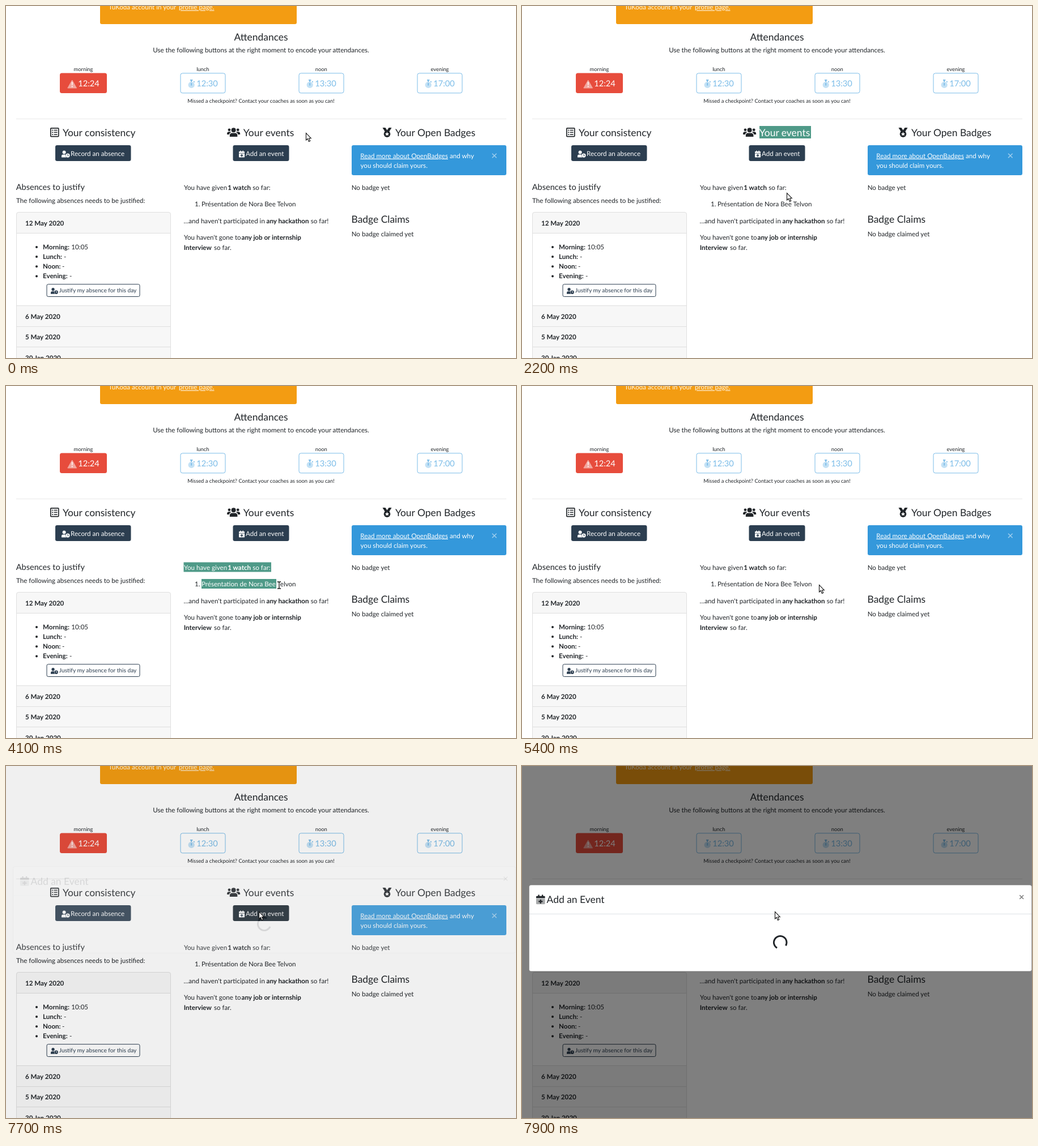
Write an HTML page that moves like this. It is 900x622 px and loops after 8 s.

```html
<!DOCTYPE html>
<html lang="en">
<head>
<meta charset="utf-8">
<title>Attendance dashboard</title>
<style>
  html, body { margin: 0; width: 100%; height: 100%; overflow: hidden; background: #fff; }
  svg { display: block; }
  text { font: 11.6px Lato, sans-serif; text-rendering: geometricPrecision; }
  .h { font-size: 17.45px; }
  .h5 { font-size: 14.55px; }
  .time { font-size: 14.7px; }
  .sm { font-size: 9.35px; }
  .btn { font-size: 10.2px; }
  .mid { text-anchor: middle; }
  .b { font-weight: 700; }
  .u { text-decoration: underline; }
</style>
</head>
<body>
<svg width="900" height="622" viewBox="0 0 900 622" fill="#212529">
  <defs>
    <g id="person">
      <circle cx="4.6" cy="3" r="3"/>
      <path d="M0 12V9.6Q0 7 2.6 7H7Q6.4 10 8.4 12Z"/>
      <circle cx="11" cy="8.6" r="3.6"/>
      <path d="M11 6.4V8.8H12.6" fill="none" stroke="var(--bg)"/>
    </g>
    <g id="calendar">
      <path d="M0 5H11V11Q11 12 10 12H1Q0 12 0 11Z" fill="var(--body)"/>
      <path d="M0 4.3V2.6Q0 1.6 1 1.6H2.4V0H4V1.6H7V0H8.6V1.6H10Q11 1.6 11 2.6V4.3Z"/>
      <path d="M5.5 6V11M3 8.5H8" stroke="var(--plus)" stroke-width="1.5"/>
    </g>
    <g id="watch">
      <circle cx="6.2" cy="9.4" r="5.6" opacity=".45"/>
      <path d="M4 0H8.4V1.8H7.2V4H5.2V1.8H4ZM9.6 3.8L10.8 2.6L12.2 4L11 5.2ZM5.3 6H7.1V10.4H5.3Z"/>
    </g>
    <clipPath id="selection">
      <rect id="selHead" y="212" height="22"/>
      <rect id="selTop" x="313.5" y="311.5" height="17"/>
      <rect id="selItem" x="345" y="341" height="17"/>
    </clipPath>
  </defs>

  <!-- notice and attendance -->
  <rect x="166" y="-10" width="347" height="42" rx="3" fill="#f39c12"/>
  <g fill="#fff" opacity=".92">
    <text x="181" y="6.4">TuKoda account in your</text>
    <text x="305" y="6.4" class="u">profile page.</text>
  </g>
  <text x="450" y="61.3" class="h mid">Attendances</text>
  <text x="450" y="81.5" class="mid">Use the following buttons at the right moment to encode your attendances.</text>
  <g class="mid">
    <text x="136.5" y="114.6" class="sm">morning</text>
    <text x="347.3" y="114.6" class="sm">lunch</text>
    <text x="556.3" y="114.6" class="sm">noon</text>
    <text x="765.5" y="114.6" class="sm">evening</text>
    <text x="450" y="170.6" class="sm">Missed a checkpoint? Contact your coaches as soon as you can!</text>
  </g>
  <rect x="95" y="118.5" width="83" height="35.5" rx="3.5" fill="#e74c3c"/>
  <g fill="#fff">
    <path d="M116.7 131L124.6 145H108.8Z" opacity=".5" stroke="#fff" stroke-linejoin="round"/>
    <path d="M115.8 134.5H117.7L117.3 140H116.2ZM115.8 141.4H117.7V143.2H115.8Z"/>
    <text x="146" y="141.8" class="time mid">12:24</text>
  </g>
  <g id="slots" fill="#7bbce8"></g>
  <path d="M18 199.5H883" stroke="#e9e9e9"/>

  <!-- consistency -->
  <g stroke="#212529" fill="none">
    <rect x="78.8" y="215.8" width="14" height="14.8" rx="1" stroke-width="1.7"/>
    <path d="M81 219.5H83.2M81 223.2H83.2M81 227H83.2M84.6 219.5H90.6M84.6 223.2H90.6M84.6 227H90.6" stroke-width="1.5"/>
  </g>
  <text x="100" y="229.5" class="h">Your consistency</text>
  <rect x="87" y="246" width="133.5" height="28" rx="3.2" fill="#2c3e50"/>
  <use href="#person" x="98" y="255.5" fill="#fff" style="--bg:#2c3e50"/>
  <text x="114" y="264.6" fill="#fff">Record an absence</text>
  <text x="17.7" y="325.4" class="h5">Absences to justify</text>
  <text x="18" y="348">The following absences needs to be justified:</text>
  <path d="M18.5 401.5V368Q18.5 364.5 22 364.5H287Q290.5 364.5 290.5 368V401.5ZM18.5 529.5H290.5V630H18.5Z" fill="#f7f7f7"/>
  <path d="M18.5 630V368Q18.5 364.5 22 364.5H287Q290.5 364.5 290.5 368V630M18 401.5H291M18 529.5H291M18 566.5H291M18 602.5H291" fill="none" stroke="#dfdfdf"/>
  <g class="b">
    <text x="34" y="387.6" class="b">12 May 2020</text>
    <text x="34" y="552.8" class="b">6 May 2020</text>
    <text x="34" y="589.4" class="b">5 May 2020</text>
    <text x="34" y="626" class="b">30 Jan 2020</text>
  </g>
  <g id="times"></g>
  <rect x="72" y="491.7" width="164" height="21.8" rx="2.5" fill="none" stroke="#2c3e50"/>
  <use href="#person" transform="translate(79 498) scale(.88 .9)" fill="#2c3e50" style="--bg:#fff"/>
  <text x="93.8" y="506.3" class="btn" fill="#2c3e50">Justify my absence for this day</text>

  <!-- events -->
  <path d="M394.8 231Q394.2 224.8 398.4 224.4H404.8Q409 224.8 408.4 231ZM390 227Q389.8 222.4 393 222.3H396Q397 222.4 397.2 223Q394.4 224 393.8 227ZM413.2 227Q413.4 222.4 410.2 222.3H407.2Q406.2 222.4 406 223Q408.8 224 409.4 227Z"/>
  <circle cx="401.6" cy="219.3" r="4"/>
  <circle cx="394" cy="218.8" r="2.4"/>
  <circle cx="409.2" cy="218.8" r="2.4"/>
  <rect id="addBtn" x="400.5" y="246" width="99" height="28" rx="3.2"/>
  <use href="#calendar" transform="translate(411 255.5) scale(.92 1)" fill="#fff" style="--body:#fff;--plus:#2c3e50"/>
  <text x="423" y="264.6" fill="#fff">Add an event</text>
  <g id="events">
    <text x="418.8" y="229.5" class="h">Your events</text>
    <text x="314" y="324.7">You have given</text>
    <text x="391.3" y="324.7" class="b">1 watch</text>
    <text x="435.3" y="324.7">so far:</text>
    <text x="345" y="354.3">Présentation de Nora Bee Telvon</text>
  </g>
  <text x="333" y="354.3">1.</text>
  <text x="313.5" y="384">…and haven't participated in</text>
  <text x="459.5" y="384" class="b">any hackathon</text>
  <text x="537.8" y="384">so far!</text>
  <text x="314" y="413.4">You haven't gone to</text>
  <text x="415.5" y="413.4" class="b">any job or internship</text>
  <text x="313.7" y="430.6" class="b">Interview</text>
  <text x="367" y="430.6">so far.</text>
  <g clip-path="url(#selection)">
    <rect x="300" y="200" width="230" height="170" fill="#4f9a88"/>
    <use href="#events" fill="#fff"/>
  </g>

  <!-- badges -->
  <path d="M664.5 215H669.5L672.5 219.6L675.5 215H680.5L676.3 222H668.7Z"/>
  <circle cx="672.5" cy="226.2" r="5.8"/>
  <path d="M672.5 222.6L673.6 225H676.1L674.2 226.7L674.8 229.2L672.5 227.9L670.2 229.2L670.8 226.7L668.9 225H671.4Z" fill="#fff"/>
  <text x="687" y="229.5" class="h">Your Open Badges</text>
  <rect x="610" y="246" width="273" height="53" rx="3.2" fill="#3498db"/>
  <g fill="#fff">
    <text x="625.3" y="268.8" class="u">Read more about OpenBadges</text>
    <text x="783" y="268.8">and why</text>
    <text x="625.5" y="286">you should claim yours.</text>
    <path d="M858 260.7L865.6 268.3M865.6 260.7L858 268.3" stroke="#fff" stroke-width="1.6" opacity=".5"/>
  </g>
  <text x="609.7" y="324.7">No badge yet</text>
  <text x="609.5" y="383" class="h">Badge Claims</text>
  <text x="609.7" y="406.5">No badge claimed yet</text>

  <!-- dialog -->
  <rect id="shade" width="900" height="622" fill="#000"/>
  <g id="dialog">
    <rect x="12.5" y="210.3" width="887" height="152.5" rx="3.5" fill="#fff" stroke="#000" stroke-opacity=".2"/>
    <path d="M13 261.5H899" stroke="#dee2e6"/>
    <use href="#calendar" transform="translate(25 227.5) scale(1.42 1.4)" style="--body:#a6a8a9;--plus:#212529"/>
    <text x="43.6" y="242.3" class="h">Add an Event</text>
    <path d="M878.2 228.2L885 235M885 228.2L878.2 235" stroke="#7f7f7f" stroke-width="1.6"/>
    <path id="spinner" d="M8 8A11.3 11.3 0 1 1 8 -8" fill="none" stroke="#212529" stroke-width="2.9"/>
  </g>

  <g id="cursor">
    <path id="arrow" d="M.5 .5V13L3.3 10.5L5.4 15.5L7.7 14.5L5.6 9.7H9.3Z" fill="#fff" stroke="#111" stroke-width="1.1"/>
    <g id="beam" fill="none">
      <path d="M-3 -6H-1L0 -5L1 -6H3M0 -5V5M-3 6H-1L0 5L1 6H3" stroke="#fff" stroke-width="2.6"/>
      <path d="M-3 -6H-1L0 -5L1 -6H3M0 -5V5M-3 6H-1L0 5L1 6H3" stroke="#111" stroke-width="1.3"/>
    </g>
  </g>
</svg>
<script>
const $ = id => document.getElementById(id);
const set = (id, attrs) => {
  for (const k in attrs) $(id).setAttribute(k, attrs[k]);
};
const clamp = (v, lo, hi) => Math.min(hi, Math.max(lo, v));

$('slots').innerHTML = ['12:30', '13:30', '17:00'].map((time, i) => {
  const x = 308 + 209 * i;
  return `<rect x="${x}" y="118.8" width="79" height="35" rx="3.5" fill="none" stroke="#7bbce8"/>
    <use href="#watch" x="${x + 13}" y="130"/>
    <text x="${x + 47}" y="141.8" class="time mid">${time}</text>`;
}).join('');

$('times').innerHTML = [['Morning:', '10:05', 115.3], ['Lunch:', '-', 102], ['Noon:', '-', 99], ['Evening:', '-', 112]]
  .map(([label, value, x], i) => {
    const y = 429.9 + 17.17 * i;
    return `<circle cx="54" cy="${y - 4}" r="2"/>
      <text x="65" y="${y}" class="b">${label}</text><text x="${x}" y="${y}">${value}</text>`;
  }).join('');

// Pointer path: time / 100, x, y, text beam?
const path = [
  [0, 529, 224], [2, 529, 224], [3, 528, 223], [4, 528, 223],
  [5, 524, 231, 1], [7, 482, 232, 1], [10, 430, 232, 1], [11, 430, 232, 1], [12, 421, 234, 1],
  [13, 414, 228], [17, 414, 228], [18, 426, 236], [19, 456, 262], [20, 484, 298], [21, 488, 322],
  [22, 467, 330], [23, 424, 342, 1], [24, 380, 347, 1], [26, 380, 347, 1],
  [33, 315, 323, 1], [34, 315, 323, 1], [36, 325, 326, 1], [38, 375, 338, 1],
  [41, 482, 352, 1], [42, 503, 354, 1], [43, 513, 354, 1],
  [44, 516, 351], [46, 524, 351], [62, 524, 351], [63, 521, 347], [65, 495, 318], [67, 462, 278],
  [69, 446, 257], [80, 446, 257]
];

function pointer(step) {
  const i = path.findLastIndex(p => p[0] <= step);
  const a = path[i], b = path[i + 1] || a;
  const k = a === b ? 0 : (step - a[0]) / (b[0] - a[0]);
  return { x: a[1] + (b[1] - a[1]) * k, y: a[2] + (b[2] - a[2]) * k, beam: !!a[3] };
}

// Dialog offset, dialog opacity, shade opacity
const opening = { 77: [-32.5, .12, .06], 78: [-14, .75, .39], 79: [0, 1, .5] };

function draw(step) {
  const { x, y, beam } = pointer(step);
  set('cursor', { transform: `translate(${x} ${y})` });
  set('arrow', { visibility: beam ? 'hidden' : 'visible' });
  set('beam', { visibility: beam ? 'visible' : 'hidden' });

  const headX = step < 5 || step > 34 ? 510 : step > 12 ? 419 : clamp(x, 419, 510);
  set('selHead', { x: headX, width: 510 - headX });

  const dragging = step > 34 && step < 54;
  const onItem = y > 335;
  set('selTop', { width: dragging ? (onItem ? 154.5 : clamp(x - 313.5, 0, 154.5)) : 0 });
  set('selItem', { width: dragging && onItem ? (step > 43 ? 169.5 : clamp(x - 350, 0, 162)) : 0 });

  const hover = x > 400 && x < 500 && y > 246 && y < 274;
  set('addBtn', { fill: step > 75 ? '#1a252f' : hover ? '#1e2b37' : '#2c3e50' });

  const [dy, alpha, shade] = opening[step] || [0, 0, 0];
  set('shade', { opacity: shade });
  set('dialog', { opacity: alpha, transform: `translate(0 ${dy})` });
  set('spinner', { transform: `translate(455.7 311.8) rotate(${75 + 48 * (step - 79)})` });
}

function tick() {
  draw(Math.floor(performance.now() % 8000 / 100));
  requestAnimationFrame(tick);
}
tick();
</script>
</body>
</html>
```
